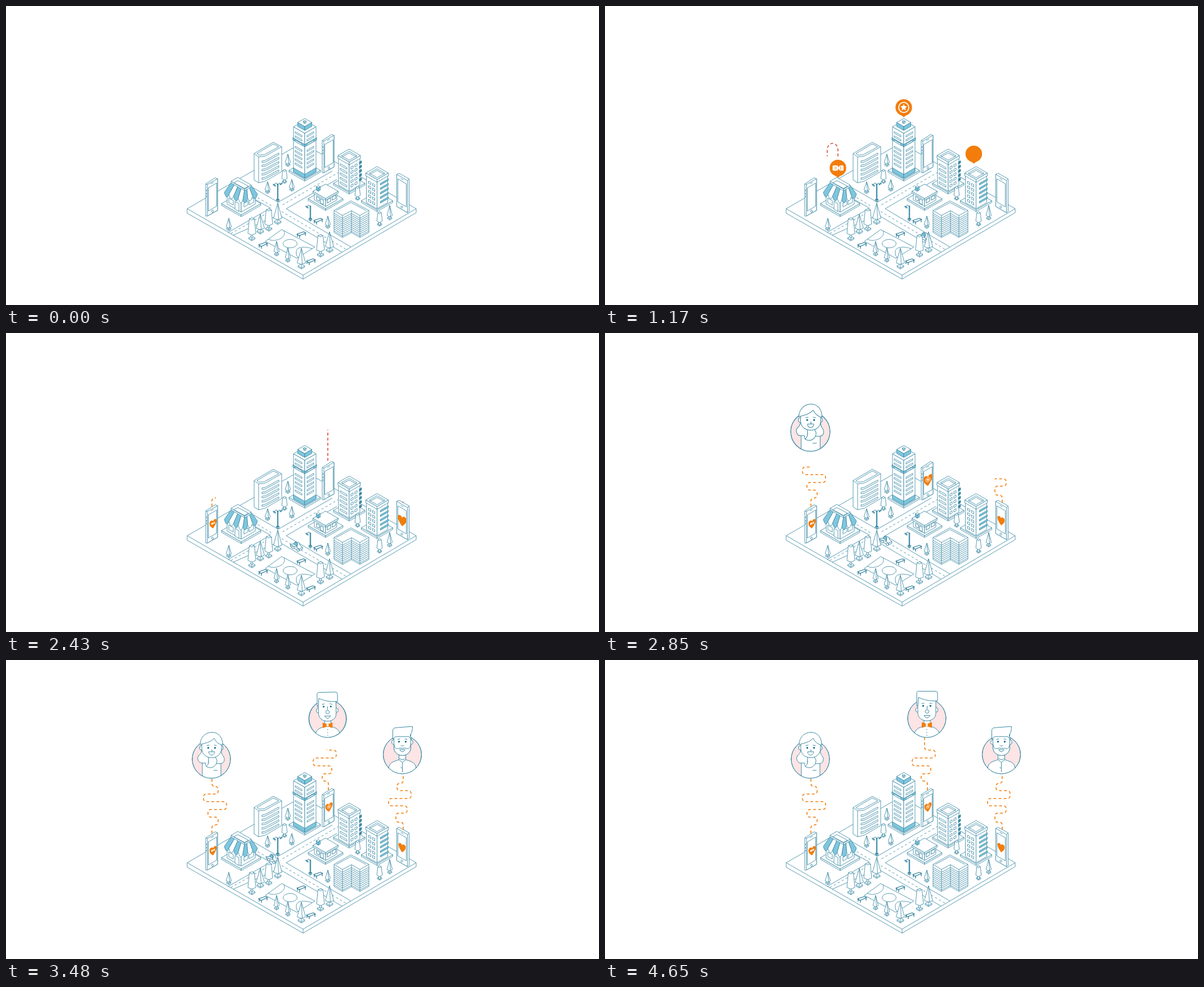
These frames come from a looping animation (1054 by 531 pixels, 4.68 s). An HTML page with a canvas:

```html
<!DOCTYPE html>
<html lang="en">
<head>
<meta charset="utf-8">
<title>City</title>
<style>
html, body { margin: 0; width: 100%; height: 100%; overflow: hidden; background: #fff; }
canvas { display: block; width: 100%; height: 100%; }
</style>
</head>
<body>
<canvas id="stage" width="1054" height="531"></canvas>
<script>
const g = document.getElementById('stage').getContext('2d');
const LOOP = 4680, K = 0.573, TAU = Math.PI * 2;
const LINE = '#3c8aa4', BLUE = '#7fc6dd', DARK = '#1f7391', PINK = '#fde4e5';
const ORANGE = '#f27d0c', RED = '#d9493a', WHITE = '#fff';

const clamp = v => Math.max(0, Math.min(1, v));
const mix = (a, b, u) => a + (b - a) * u;
const smooth = u => u * u * (3 - 2 * u);

function ink(fill) {
  if (fill) { g.fillStyle = fill; g.fill(); }
  g.stroke();
}

function trace(p) {
  g.beginPath();
  for (let i = 0; i < p.length; i += 2) g.lineTo(p[i], p[i + 1]);
}

function poly(p, fill = WHITE) { trace(p); g.closePath(); ink(fill); }
function line(...p) { trace(p); g.stroke(); }
function shape(d, fill) {
  const p = new Path2D(d);
  if (fill) { g.fillStyle = fill; g.fill(p); }
  g.stroke(p);
}
function oval(x, y, rx, ry, fill) {
  g.beginPath();
  g.ellipse(x, y, rx, ry, 0, 0, TAU);
  ink(fill);
}
function dot(x, y, r, color) {
  g.beginPath();
  g.arc(x, y, r, 0, TAU);
  g.fillStyle = color;
  g.fill();
}

// Isometric pieces: (x, y) is the front bottom corner
function box(x, y, l, r, h, fill = WHITE, top = WHITE) {
  poly([x, y, x - l, y - l * K, x - l, y - l * K - h, x, y - h], fill);
  poly([x, y, x + r, y - r * K, x + r, y - r * K - h, x, y - h], fill);
  poly([x, y - h, x - l, y - l * K - h, x - l + r, y - (l + r) * K - h, x + r, y - r * K - h], top);
}
function pane(x, y, w, h, s, fill = WHITE) {
  poly([x, y, x + w, y + w * s, x + w, y + w * s + h, x, y + h], fill);
}
function panes(n, step, x, y, ...rest) {
  for (let i = 0; i < n; i++) pane(x, y + i * step, ...rest);
}

function pot(x, y, w) {
  const d = w * K;
  poly([x, y, x - w, y - d, x - w, y - d - 2, x, y - 2 * d - 2, x + w, y - d - 2, x + w, y - d]);
  line(x - w, y - d - 2, x, y - 2, x + w, y - d - 2);
  line(x, y, x, y - 2);
  line(x, y - 3, x, y - 9);
}
function cone(x, y, h = 21) {
  const w = h > 30 ? 7.5 : 4.7, b = h * 0.25;
  pot(x, y, w * 0.8);
  poly([x, y - h, x - w, y - b - 1.5, x, y - b + 1, x + w, y - b - 1.5]);
  line(x, y - h, x + 1.5, y - b + 1);
}
function column(x, y, h = 25) {
  const w = h > 30 ? 7 : 4.8, t = y - h, b = y - h * 0.27;
  pot(x, y, w * 0.8);
  pane(x - 1.5, b, 3, 5, 0);
  poly([x - w * 0.65, t + 2, x, t, x + w * 0.65, t + 2, x + w, b - 2, x, b + 1, x - w, b - 2]);
  line(x - w * 0.65, t + 2, x, t + 4, x + w * 0.65, t + 2);
}
function bench(x, y) {
  g.strokeStyle = DARK;
  g.lineWidth = 1.2;
  poly([x - 8, y - 2, x + 4, y - 6, x + 8, y - 4, x - 4, y + 1]);
  line(x - 7, y - 1, x - 7, y + 3);
  line(x - 3, y + 1, x - 3, y + 5);
  line(x + 7, y - 3, x + 7, y + 1);
  g.strokeStyle = LINE;
  g.lineWidth = 0.85;
}
function lamp(x, y, h, arms) {
  g.strokeStyle = DARK;
  box(x, y, 2.5, 2.5, 3);
  pane(x - 0.7, y - h + 2, 1.4, h - 5, 0, BLUE);
  for (const s of arms) {
    line(x, y - h + 4, x + s * 3, y - h, x + s * 6, y - h + 3);
    pane(x + s * 6 - 2, y - h + 2, 4, 2, -s * K, BLUE);
  }
  g.strokeStyle = LINE;
}

function phoneLeft(x, y) {
  poly([x, y, x, y - 57, x + 17, y - 68, x + 21, y - 66, x + 21, y - 10, x + 3, y]);
  pane(x + 3, y - 56, 18, 56, -K);
  line(x, y - 57, x + 3, y - 56);
  pane(x + 4.5, y - 50, 15, 41, -K);
  oval(x + 12, y - 8.5, 1.6, 2);
  line(x + 9, y - 57, x + 14, y - 60);
  for (const d of [47, 41, 36]) line(x + 1.4, y - d, x + 1.4, y - d + 3);
}
function phoneRight(x, y) {
  poly([x, y, x, y - 57, x + 4, y - 59, x + 22, y - 49, x + 22, y + 9, x + 19, y + 11]);
  pane(x, y - 57, 19, 57, K);
  line(x + 19, y - 46, x + 22, y - 49);
  pane(x + 2, y - 49, 15, 41, K);
  oval(x + 9, y + 1, 1.6, 2);
  line(x + 7, y - 50, x + 12, y - 47);
}

function ground() {
  poly([322, 360, 526, 243, 729, 360, 729, 367, 528, 485, 322, 368]);
  line(322, 360, 528, 478, 729, 360);
  line(528, 478, 528, 485);
  line(429, 317, 484, 348.5, 580, 293);
  line(588, 308, 498, 360, 613, 428);
  line(395, 402, 470, 359, 440, 342);
  line(404, 407, 485, 371, 597, 437);
  g.setLineDash([4, 4]);
  line(592, 295, 490, 354);
  line(473, 363, 398, 405);
  line(420, 324, 474, 356);
  line(490, 365, 606, 433);
  g.setLineDash([]);
  poly([461, 418, 490, 397, 549, 428, 517, 448]);
  oval(505, 422, 12.5, 7.5);
  shape('M466 414C478 421 500 411 494 399M516 437C516 426 533 427 544 431M516 437Q515 442 519 447');
}

function office() {
  poly([441, 262, 475, 242, 490, 250, 490, 294, 461, 311, 449, 314, 441, 309]);
  line(441, 262, 449, 268, 460, 267, 490, 250);
  line(446, 262, 475, 245, 485, 250, 459, 264, 450, 265, 446, 262);
  line(449, 268, 449, 314);
  for (let i = 0; i < 5; i++) {
    const y = 275 + i * 7.5;
    poly([455, y, 461, y - 1, 485, y - 14, 485, y - 11, 461, y + 2, 455, y + 3]);
  }
}

function skyscraper() {
  box(531, 311, 28, 28, 3);
  box(531, 306, 20, 20, 57);
  pane(511, 287.5, 20, 7, K, BLUE);
  pane(531, 299, 20, 7, -K, BLUE);
  box(531, 250, 21, 21, 4, BLUE);
  box(531, 246, 20, 20, 20);
  box(531, 221, 12.5, 12.5, 7, BLUE);
  box(531, 209, 2.5, 2.5, 3);
  for (const [n, y] of [[3, 223], [5, 249]]) {
    panes(n, 7.4, 514, y, 12, 2.6, K);
    panes(n, 7.4, 535, y + 7, 12, 2.6, -K);
  }
}

function tower(x, y, flip) {
  box(x, y + 5, 28, 28, 3);
  box(x, y, 19, 19, 50);
  box(x, y - 47, 20, 20, 5);
  poly([x, y - 55, x - 14, y - 63, x, y - 71, x + 14, y - 63]);
  line(x - 13, y - 61, x, y - 68, x + 13, y - 61);
  if (flip) {
    panes(5, 8, x - 15, y - 49, 4, 4, K);
    panes(5, 8, x - 8, y - 45, 4, 4, K);
    panes(5, 8, x + 6, y - 45, 14, 3, -K, BLUE);
  } else {
    panes(5, 8, x - 16, y - 49, 12, 3, K);
    panes(5, 8, x + 3, y - 43, 4, 4, -K);
    panes(5, 8, x + 10, y - 47, 4, 4, -K);
    panes(5, 7.5, x + 18, y - 52, 4, 4, -K, LINE);
  }
}

function house() {
  box(568, 363, 31, 31, 3);
  box(568, 356, 20, 20, 16);
  g.strokeStyle = DARK;
  pane(552, 338, 5, 6, K);
  pane(559, 342, 5, 8, K);
  pane(571, 344, 6, 6, -K);
  pane(580, 339, 6, 6, -K);
  g.strokeStyle = LINE;
  box(568, 345, 22.5, 22.5, 3);
  box(555, 329, 3.5, 3.5, 6, BLUE);
}

function blocks() {
  const top = [583, 363, 598, 372, 614, 363.5, 629, 372, 645, 363];
  const row = d => line(...top.map((v, i) => i % 2 ? v + d : v));
  poly([583, 363, 613, 346, 645, 363, 645, 402, 629, 411, 614, 402.5, 598, 411, 583, 402]);
  row(0);
  for (let i = 0; i < 5; i++) { row(5 + i * 7); row(8.5 + i * 7); }
  line(587, 363, 613, 349, 640, 363);
  for (let i = 2; i < 8; i += 2) line(top[i], top[i + 1], top[i], top[i + 1] + 39);
}

// Striped awning side between a top edge and a scalloped bottom edge
function stripes(n, a, b) {
  const at = (p, u) => [mix(p[0], p[2], u), mix(p[1], p[3], u)];
  for (let i = 0; i < n; i++) {
    const u = i / n, v = (i + 1) / n;
    const r = at(b, v), s = at(b, u);
    g.beginPath();
    g.moveTo(...at(a, u));
    g.lineTo(...at(a, v));
    g.lineTo(...r);
    g.quadraticCurveTo((r[0] + s[0]) / 2, (r[1] + s[1]) / 2 + 13, ...s);
    g.closePath();
    ink(i % 2 ? WHITE : BLUE);
  }
}
function shop() {
  box(418, 374, 35, 35, 3);
  box(418, 366, 25, 25, 22);
  pane(396, 341, 8, 8, K);
  pane(407, 347, 7, 14, K);
  pane(423, 350, 7, 7, -K);
  pane(432, 345, 8, 8, -K);
  stripes(4, [400, 314, 424, 327], [388, 331, 421, 345]);
  stripes(3, [424, 327, 437, 320], [421, 345, 447, 334]);
  box(424, 328, 24, 12, 3);
  line(405, 314, 412, 310, 431, 320, 424, 324, 405, 314);
}

function car(t) {
  const x = 548 - 0.0409 * (t - 1650), y = 398 + (x - 548) * 0.605;
  g.save();
  g.globalAlpha = clamp((t - 60) / 250);
  g.strokeStyle = DARK;
  g.translate(x, y);
  poly([-11, -3, -5, -4, -2, -8, 5, -6, 7, -1, 11, 2, 11, 5, 5, 8, -10, 1]);
  poly([-5, -4, -2, -7, 2, -5, 1, 0], BLUE);
  line(-11, -2, 1, 2, 5, 5, 11, 2);
  line(5, 5, 5, 8);
  line(1, 2, 2, -5);
  oval(-6, 2, 2, 2.4, WHITE);
  oval(3, 7, 2, 2.4, WHITE);
  g.restore();
}

function city(t) {
  g.strokeStyle = LINE;
  g.lineWidth = 0.85;
  g.lineJoin = 'round';
  ground();
  office();
  cone(501, 285, 22);
  phoneLeft(562, 296);
  skyscraper();
  column(495, 315);
  cone(465, 333);
  cone(508, 329);
  car(t);
  lamp(483, 348, 34, [-1, 1]);
  phoneLeft(355, 373);
  shop();
  tower(610, 329, false);
  house();
  column(625, 345);
  phoneRight(694.5, 356);
  tower(659.5, 360, true);
  cone(682, 380, 26);
  column(664, 391, 26);
  lamp(541, 382, 29, [-1]);
  bench(555, 383);
  cone(572, 395, 22);
  blocks();
  cone(396, 399, 22);
  cone(483, 388, 38);
  column(467, 400, 40);
  cone(452, 405, 35);
  column(437, 417, 41);
  bench(525, 407);
  bench(457, 426);
  cone(481, 444, 26);
  cone(501, 455, 26);
  cone(575, 438, 37);
  column(559, 446, 40);
  bench(542, 455);
  cone(525, 467, 37);
}

// Dashed paths, drawn between two fractions of their length
function track(d) {
  const el = document.createElementNS('http://www.w3.org/2000/svg', 'path');
  el.setAttribute('d', d);
  const pts = [], n = Math.floor(el.getTotalLength());
  for (let i = 0; i <= n; i++) pts.push(el.getPointAtLength(i));
  return pts;
}
function dashes(pts, from, to, color) {
  const a = Math.round(from * (pts.length - 1)), b = Math.round(to * (pts.length - 1));
  g.strokeStyle = color;
  g.lineWidth = 1.6;
  g.beginPath();
  for (let i = a; i < b; i++) {
    if (i % 9 > 4) continue;
    g.moveTo(pts[i].x, pts[i].y);
    g.lineTo(pts[i + 1].x, pts[i + 1].y);
  }
  g.stroke();
}
function hop(x, y, w, h) {
  const [a, b, c] = [x + w * 0.37, x + w * 0.7, x + w];
  return track(`M${x} ${y}V${y - 17}C${x} ${y - 29} ${a} ${y - 29} ${a} ${y - 17}V${y + 3}` +
    `C${a} ${y + 15} ${b} ${y + 15} ${b} ${y + 3}C${b} ${y - 10} ${c} ${y - 10} ${c} ${y + 3}V${h}`);
}
function wind(x, y, rows, xs, end) {
  const r = 5.5;
  let d = `M${x} ${y}`;
  rows.forEach((row, i) => {
    const nx = xs[i], s = Math.sign(nx - x);
    d += `V${row + r}Q${x} ${row} ${x + s * r} ${row}H${nx - s * r}Q${nx} ${row} ${nx} ${row - r}`;
    x = nx;
  });
  return track(d + `V${end}`);
}

function pop(t, peak = 1.3) {
  if (t <= 0) return 0;
  if (t < 330) return peak * Math.sin(t / 330 * Math.PI / 2);
  return mix(1, peak, (1 + Math.cos(Math.PI * clamp((t - 330) / 230))) / 2);
}
function scaled(x, y, k, draw) {
  if (k <= 0) return;
  g.save();
  g.translate(x, y);
  g.scale(k, k);
  draw();
  g.restore();
}

function star(r) {
  g.beginPath();
  for (let i = 0; i < 10; i++) {
    const a = i * Math.PI / 5, q = i % 2 ? r * 0.48 : r;
    g.lineTo(q * Math.sin(a), -q * Math.cos(a));
  }
  g.fill();
}
function ring(r, w) {
  g.lineWidth = w;
  g.strokeStyle = WHITE;
  g.beginPath();
  g.arc(0, 0, r, 0, TAU);
  g.stroke();
}
const icons = {
  film() {
    g.fillStyle = WHITE;
    g.beginPath();
    g.roundRect(-9.5, -4.8, 9.5, 9.6, 2);
    g.fill();
    g.fill(new Path2D('M0-1L4-4.8H8Q10-4.8 10-3V3Q10 4.8 8 4.8H4L0 1Z'));
    g.fillStyle = ORANGE;
    g.fillRect(-6, -2, 4, 1);
    g.fillRect(-6, 1, 4, 1);
    g.fillRect(4.5, -4, 0.9, 8);
  },
  badge() {
    ring(9, 1.8);
    g.fillStyle = WHITE;
    star(6.3);
  },
  plain() {}
};
function pin(icon) {
  g.fillStyle = ORANGE;
  g.fill(new Path2D('M-5-4L0 0L5-4Z'));
  dot(0, -17.3, 14.7, ORANGE);
  g.translate(0, -17.3);
  icons[icon]();
}
function heart(skew, icon) {
  g.transform(0.94, skew, 0, 0.94, 0, 0);
  g.fillStyle = ORANGE;
  g.fill(new Path2D('M0 9C-4 5-6.8 1-6.8-3C-6.8-8-1.5-8.5 0-4.5C1.5-8.5 6.8-8 6.8-3C6.8 1 4 5 0 9Z'));
  g.translate(0, -0.5);
  g.scale(0.36, 0.36);
  icons[icon]();
}

// Portraits stand on the bottom of their circle at (0, 0)
function eyes(x, y, d) {
  dot(x - d, y, 1.7, DARK);
  dot(x + d, y, 1.7, DARK);
  line(x - d - 3, y - 4, x - d + 2, y - 5);
  line(x + d - 2, y - 5, x + d + 3, y - 4);
}
function torso(d) {
  g.save();
  g.beginPath();
  g.arc(0, -34, 34, 0, TAU);
  g.clip();
  shape(d, WHITE);
  g.restore();
  oval(0, -34, 34, 34);
}
function ears(x, y, w) {
  oval(x - w, y, 2.8, 4, WHITE);
  oval(x + w, y, 2.8, 4, WHITE);
}
function woman() {
  torso('M-16 4V-30H17V4Z');
  shape('M-17-50C-18-45-19-43-22-41C-27-36-23-26-16-27H-10C-11-23-9-20-6-20L-4-40Z', WHITE);
  shape('M18-50C17-44 20-41 22-38C25-31 21-26 16-26H9L6-40Z', WHITE);
  shape('M-5-40V-29C-5-25-7-23-9-21C0-15 10-22 10-32L6-40M4-14H11', WHITE);
  ears(0, -54, 18);
  shape('M-17-63V-53C-17-31 18-31 18-53V-63C12-74-10-74-17-63Z', WHITE);
  shape('M-20-60C-19-88 21-90 20-59C13-60 8-65 5-71C-2-64-11-62-20-60Z', WHITE);
  eyes(0.5, -54, 6);
  line(0, -51, 2, -49, 0, -48);
  shape('M-5-47H6C5-39-4-39-5-47Z', WHITE);
}
function beard() {
  torso('M-24 0V-12C-22-21-14-22-6-25H6C14-22 22-21 24-12V4H-24Z');
  shape('M-6-34V-25L0-20L6-25V-34M-5-27Q0-23 5-27M0-20V-3M-3-12L0-9', WHITE);
  ears(0, -56, 16);
  shape('M-15-70V-46C-14-28 14-28 15-46V-70Z', WHITE);
  shape('M-15-53C-12-38-8-48 0-45C8-48 12-38 15-53V-46C14-28-14-28-15-46Z', WHITE);
  shape('M-17-61V-77Q-17-82-9-82L18-84Q18-74 14-69L16-60L12-66H-11Q-14-66-17-61Z', WHITE);
  eyes(0, -57, 6);
  shape('M-3-51Q0-47 3-51');
  shape('M-5-43H5Q0-35-5-43Z', WHITE);
}
function bowtie() {
  torso('M-22 2V-7C-20-16-12-18-5-20H6C13-18 20-15 22-7V4H-22Z');
  shape('M-5-31V-20H6V-31', WHITE);
  ears(0, -49, 17);
  shape('M-16-72V-43C-15-25 16-25 16-43V-72Z', WHITE);
  shape('M-18-56V-79Q-17-83-13-82H16Q19-82 19-78V-65C4-64-5-67-15-71L-16-56Z', WHITE);
  eyes(0, -56, 6.5);
  oval(0.5, -46, 3.4, 3);
  line(0.5, -56, 0.5, -50);
  shape('M-5-39H6Q0-30-5-39Z', WHITE);
  g.fillStyle = ORANGE;
  g.fill(new Path2D('M-9-27L0-24L9-27V-17L0-20L-9-17Z'));
  dot(0, -22, 2.2, WHITE);
  for (let y = -14; y < 0; y += 5) dot(0, y, 0.7, DARK);
}
function portrait(draw, tilt) {
  g.strokeStyle = LINE;
  g.lineWidth = 1;
  oval(0, -34, 34, 34, PINK);
  g.rotate(tilt);
  draw();
}

const stories = [
  { pin: [414, 305], icon: 'film', pop: 60, go: 990, heart: [368, 338.5], skew: -0.4,
    red: track('M414 267V256C414 240 395 240 395 256V270C395 284 380 284 380 272C380 259 365 259 365 272V304'),
    way: wind(366, 308, [293, 279, 265.5, 251.5, 238, 224.5], [377, 359, 392, 351, 377, 366], 210),
    climb: 2375, face: woman, foot: [365, 210], rise: 2660, peak: 1.3, tilt: 0 },
  { pin: [531, 197.5], icon: 'badge', pop: 560, go: 1590, heart: [574, 261], skew: -0.4,
    red: hop(531, 162, 41, 230),
    way: wind(573, 231, [215, 202, 188, 174, 160], [562, 579, 546, 587, 568], 138),
    climb: 2945, face: bowtie, foot: [572, 137.5], rise: 3270, peak: 1.16, tilt: -0.02 },
  { pin: [655.5, 280], icon: 'plain', pop: 330, go: 1310, heart: [704, 333], skew: 0.4,
    red: hop(656, 244, 49.5, 302),
    way: wind(706, 301, [288, 272, 259, 246, 232, 219], [693, 713, 680, 720, 695, 706], 203),
    climb: 2615, face: beard, foot: [704.5, 202], rise: 2920, peak: 1.3, tilt: 0 }
];

function tell(s, t) {
  const d = t - s.go, gone = clamp((d - 270) / 210);
  const [x, y] = s.pin;
  g.globalAlpha = 1 - gone;
  scaled(x, y - 32 * gone, pop(t - s.pop), () => pin(s.icon));
  g.globalAlpha = 1;
  dashes(s.red, smooth(clamp((d - 300) / 870)), clamp(d / 470), RED);
  scaled(...s.heart, pop(d - 880), () => heart(s.skew, s.icon));
  dashes(s.way, 0, clamp((t - s.climb) / 600), ORANGE);
  const tilt = s.tilt * (1 - clamp((t - 3900) / 250));
  scaled(...s.foot, pop(t - s.rise, s.peak), () => portrait(s.face, tilt));
}

function frame(now) {
  const t = now % LOOP;
  g.fillStyle = WHITE;
  g.fillRect(0, 0, 1054, 531);
  city(t);
  for (const s of stories) tell(s, t);
}

const start = performance.now();
function tick() {
  frame(performance.now() - start);
  requestAnimationFrame(tick);
}
tick();
</script>
</body>
</html>
```
